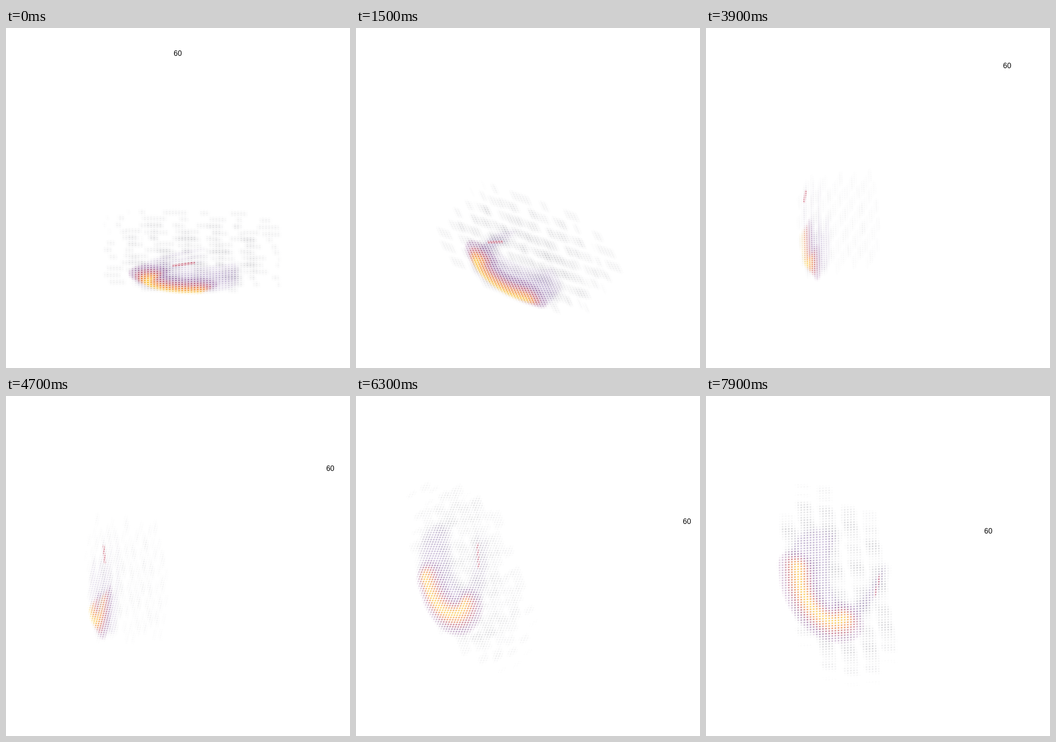
Write an HTML page without scripts that moves like this. It is 753 px wide and 744 px high and loops after 8 s.

```html
<!DOCTYPE html>
<html lang="en">
<head>
<meta charset="utf-8">
<title>Turning point cloud</title>
<style>
@property --t { syntax: "<angle>"; inherits: true; initial-value: 0deg; }

html, body { margin: 0; width: 100%; height: 100%; overflow: hidden; background: #fff; }

/* One turn angle drives everything. Each point follows
   k + a cos t + b sin t + e sin 2t, an orbit with slight perspective. */
svg {
  display: block; width: 100vw; height: 100vh;
  animation: turn 8s steps(80) infinite;
  --c: cos(var(--t));
  --s: sin(var(--t));
  --d: sin(2 * var(--t));
  /* origin */
  --ox: calc(382 + 7 * var(--c) - 166 * var(--s) + 11 * var(--d));
  --oy: calc(466 + 51 * var(--c) - 99 * var(--s) + 17 * var(--d));
  /* the two axes of the wall plane, for 100 units */
  --px: calc(-95 - 4 * var(--c) + 93 * var(--s) - 5 * var(--d));
  --py: calc(66 - 33.5 * var(--c) + 47 * var(--s) - 23 * var(--d));
  --qx: calc(-8 + 117 * var(--c) + 25 * var(--s) + 13 * var(--d));
  --qy: calc(-39.5 + 75.5 * var(--c) + 110 * var(--s) + 18 * var(--d));
  /* depth axis */
  --nx: calc(130 * var(--s));
  --ny: calc(-35 - 75 * var(--c) + 20 * var(--s));
}
@keyframes turn { to { --t: 182.28deg; } }

/* a sheet of the cloud at depth --k */
.sheet {
  transform: matrix(
    calc(var(--px) / 100), calc(var(--py) / 100),
    calc(var(--qx) / 100), calc(var(--qy) / 100),
    calc(var(--ox) + var(--k) * var(--nx)),
    calc(var(--oy) + var(--k) * var(--ny)));
}
.lattice {
  transform: matrix(
    calc(.68 - .15 * var(--s)), calc(.1 * var(--s) - .045),
    calc(.2 * var(--d)), calc(.51 - .05 * var(--c) - .07 * var(--s)),
    var(--ox), var(--oy));
}
.between { fill-opacity: calc(.17 + .12 * var(--c)); }
.cloud { opacity: calc(.84 + .16 * var(--c)); }

.haze {
  fill: none; stroke: #55555e; stroke-opacity: .1; stroke-width: 14;
  stroke-dasharray: 17 11 6 19 25 14 9 23;
  stroke-dashoffset: calc(var(--k) * 140px);
}
.wall { fill: #5b2a86; fill-opacity: .17; stroke: #55555e; stroke-opacity: .05; stroke-width: 16; }
.hot { fill: none; stroke-linecap: round; }
.spots { stroke: #bf3550; stroke-width: 5; stroke-opacity: .75; vector-effect: non-scaling-stroke; }

.label {
  font: 16px "Liberation Sans", Arial, sans-serif; text-anchor: middle;
  transform: translate(
    calc((497 - 121 * var(--c) + 166 * var(--s) - 33 * var(--d)) * 1px),
    calc((181 - 120.5 * var(--c) - 88 * var(--s) - 57 * var(--d)) * 1px));
}
</style>
</head>
<body>
<svg viewBox="0 0 753 744" preserveAspectRatio="none">
  <defs>
    <pattern id="dot" width="80" height="80" patternUnits="userSpaceOnUse">
      <path d="M5 5h72M5 15h72M5 25h72M5 35h72M5 45h72M5 55h72M5 65h72M5 75h72"
        stroke="#fff" stroke-width="6" stroke-linecap="round" stroke-dasharray="0 10"/>
    </pattern>
    <mask id="dots" maskUnits="userSpaceOnUse" x="0" y="0" width="753" height="744">
      <rect class="between" width="753" height="744" fill="#fff"/>
      <rect class="lattice" x="-960" y="-960" width="1920" height="1920" fill="url(#dot)"/>
    </mask>
    <filter id="soft" filterUnits="userSpaceOnUse" x="0" y="0" width="753" height="744"
      color-interpolation-filters="sRGB">
      <feGaussianBlur stdDeviation="2.6"/>
    </filter>
    <path id="haze" class="haze" transform="matrix(-1 1 1 1 32 45)"
      d="M-65 -42H70M-88 -22H84M-92 0H92M-88 22H92M-55 42H65"/>
    <path id="wall" class="wall"
      d="M-36 12C0 -9 60 -14 100 0S118 64 77 97 0 125 -19 85C15 75 38 60 50 45S60 10 40 6 0 10 -36 12Z"/>
    <path id="hot" class="hot" d="M76 2C100 4 112 40 84 75L66 92"/>
  </defs>

  <g mask="url(#dots)">
    <g class="cloud">
      <g filter="url(#soft)">
        <use href="#haze" class="sheet" style="--k:1"/>
        <use href="#haze" class="sheet" style="--k:.75"/>
        <use href="#haze" class="sheet" style="--k:.5"/>
        <use href="#haze" class="sheet" style="--k:.25"/>
        <use href="#haze" class="sheet" style="--k:0"/>
        <use href="#wall" class="sheet" style="--k:.24"/>
        <use href="#wall" class="sheet" style="--k:.12"/>
        <use href="#wall" class="sheet" style="--k:0"/>
        <use href="#hot" class="sheet" style="--k:.1" stroke="#6d1c70" stroke-width="54" stroke-opacity=".42"/>
        <use href="#hot" class="sheet" style="--k:.05" stroke="#cb3f48" stroke-width="36" stroke-opacity=".62"/>
        <use href="#hot" class="sheet" style="--k:0" stroke="#f4801f" stroke-width="23" stroke-opacity=".85"/>
        <use href="#hot" class="sheet" style="--k:-.05" stroke="#fcc41c" stroke-width="10" stroke-opacity=".85"/>
      </g>
      <path class="sheet spots" style="--k:0" d="M17 -7L-17 7"/>
    </g>
  </g>
  <text class="label">60</text>
</svg>
</body>
</html>
```
